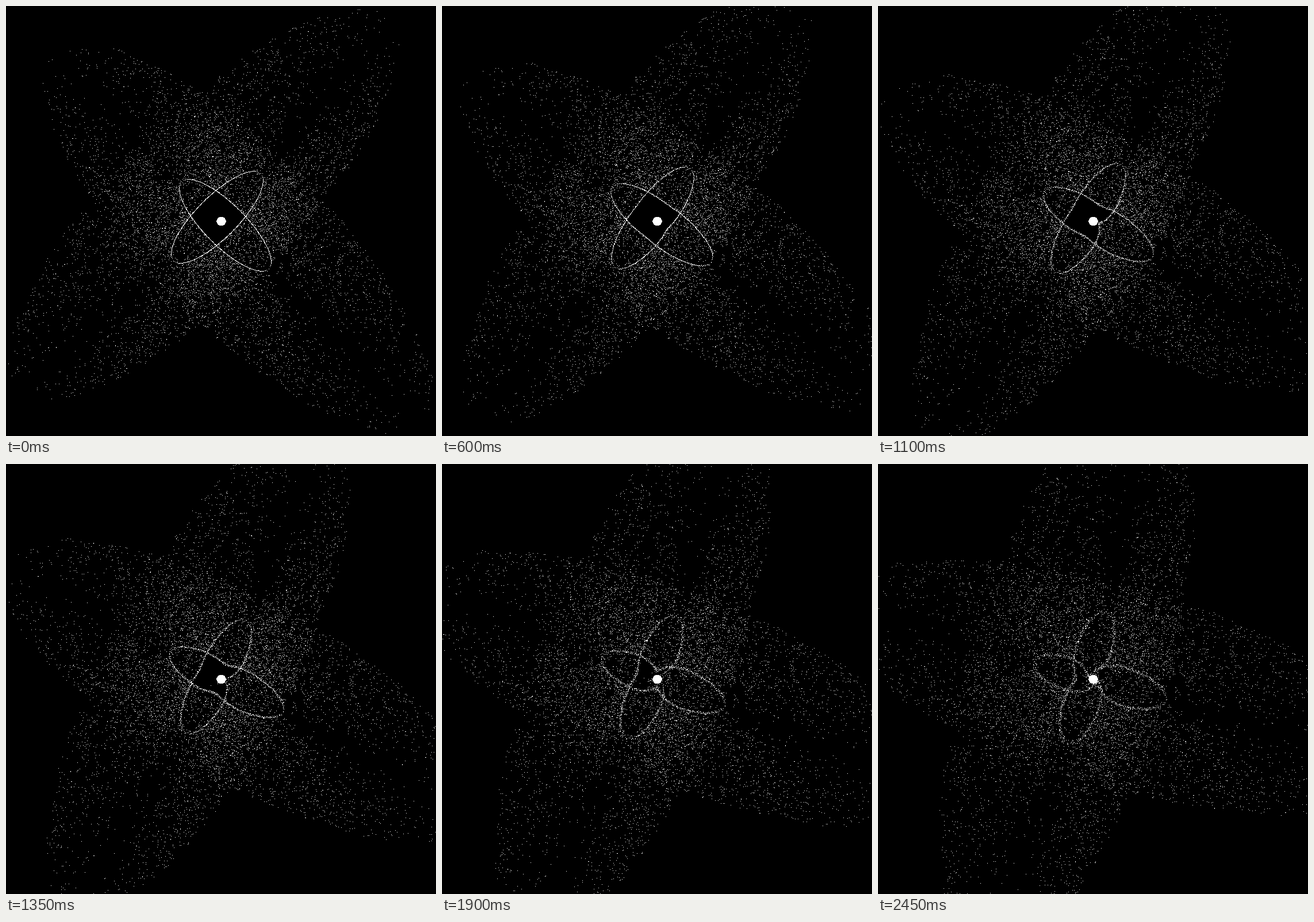
Animation of 748 by 748 pixels, one loop 2500 ms. Source, as an HTML page with a canvas:

```html
<!DOCTYPE html>
<html lang="en">
<head>
<meta charset="utf-8">
<title>Orbiting particles</title>
<style>
  html, body { margin: 0; width: 100%; height: 100%; overflow: hidden; background: #000; }
  canvas { display: block; }
</style>
</head>
<body>
<canvas id="stage" width="748" height="748"></canvas>
<script>
const SIZE = 748, CENTER = 374;
const STEPS = 50, STEP_MS = 50;
const SEMI_MAJOR = 107, SEMI_MINOR = 36, OFFSET = 7;
const MAX_SCALE = 4.26;
const RING_COUNT = 560, CLOUD_COUNT = 4300;
const SPIN = 0.0112, GRAVITY = 35, JITTER = 0.05;
const SUN_RADIUS = 7.6;

const ctx = document.getElementById('stage').getContext('2d');

let seed = 20117;
function random() {
  seed = (seed + 0x6D2B79F5) | 0;
  let t = Math.imul(seed ^ (seed >>> 15), 1 | seed);
  t = (t + Math.imul(t ^ (t >>> 7), 61 | t)) ^ t;
  return ((t ^ (t >>> 14)) >>> 0) / 4294967296;
}
const jitter = () => (random() * 2 - 1) * JITTER;

// A particle on a tilted ellipse, spinning counterclockwise about the sun.
// u in -1..1 is the place along the major axis, half picks the near or far arc.
function makeParticle(side, u, half, scale) {
  const along = SEMI_MAJOR * u * Math.SQRT1_2;
  const across = half * SEMI_MINOR * Math.sqrt(1 - u * u) * Math.SQRT1_2;
  const x = scale * (along - side * across + side * OFFSET);
  const y = scale * (side * along + across + side * OFFSET);
  return { x, y, vx: SPIN * y + jitter(), vy: -SPIN * x + jitter() };
}

function makeParticles() {
  const list = [];
  for (const side of [-1, 1]) {
    for (let i = 0; i < RING_COUNT; i++) {
      const u = 2 * Math.floor(i / 2) / (RING_COUNT / 2 - 1) - 1;
      list.push(makeParticle(side, u, i % 2 ? 1 : -1, 1));
    }
    for (let i = 0; i < CLOUD_COUNT; i++) {
      const scale = 1 + random() * (MAX_SCALE - 1);
      list.push(makeParticle(side, random() * 2 - 1, i % 2 ? 1 : -1, scale));
    }
  }
  return list;
}

function advance(p) {
  const pull = GRAVITY / Math.hypot(p.x, p.y) ** 3;
  p.vx -= p.x * pull;
  p.vy -= p.y * pull;
  p.x += p.vx;
  p.y += p.vy;
}

function simulate() {
  const particles = makeParticles();
  const history = [];
  for (let step = 0; step < STEPS; step++) {
    const points = [];
    for (const p of particles) {
      const x = Math.round(CENTER + p.x), y = Math.round(CENTER + p.y);
      if (x >= 0 && x < SIZE && y >= 0 && y < SIZE) points.push(x, y);
      advance(p);
    }
    history.push(Int16Array.from(points));
  }
  return history;
}

function drawSun() {
  for (let y = -7; y <= 7; y++) {
    const half = Math.round(Math.sqrt(SUN_RADIUS ** 2 - y * y));
    ctx.fillRect(CENTER - half, CENTER + y, 2 * half + 1, 1);
  }
}

function draw(points) {
  ctx.fillStyle = '#000';
  ctx.fillRect(0, 0, SIZE, SIZE);
  ctx.fillStyle = '#fff';
  for (let i = 0; i < points.length; i += 2) ctx.fillRect(points[i], points[i + 1], 1, 1);
  drawSun();
}

const history = simulate();
const start = performance.now();
let shown = -1;

function tick() {
  const step = Math.floor((performance.now() - start) / STEP_MS) % STEPS;
  if (step !== shown) {
    draw(history[step]);
    shown = step;
  }
  requestAnimationFrame(tick);
}
tick();
</script>
</body>
</html>
```
